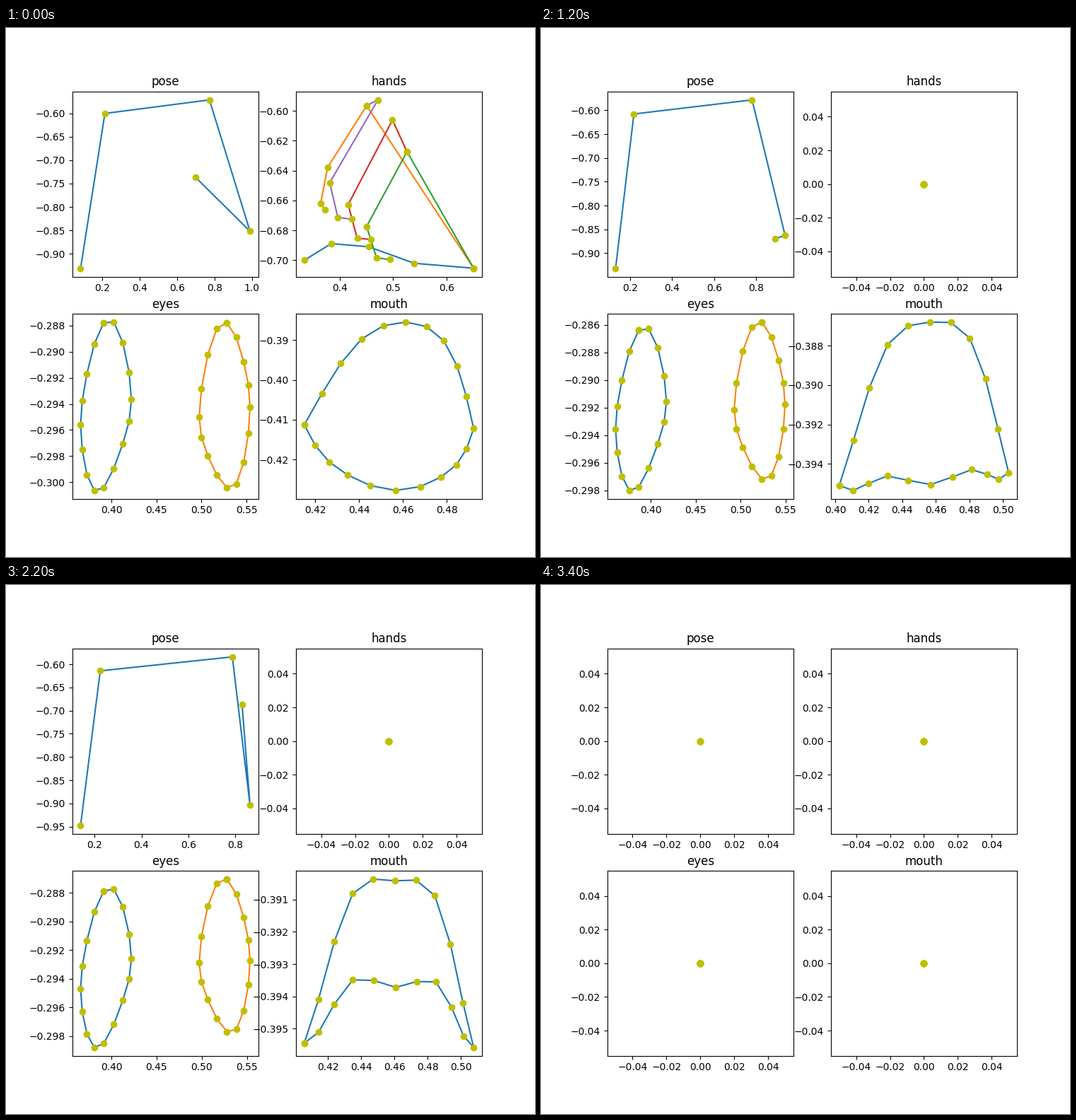
These frames come from a looping animation (748x748 px, 3800 ms). A matplotlib script:

```python
import numpy as np
import matplotlib.pyplot as plt
from matplotlib.animation import FuncAnimation

FRAMES, STEP = 19, 200
HAND_LOST, ALL_LOST = 5, 17
KEYS = [0, 2, 4, 8, 11, 13]

# Left elbow, right elbow, right wrist (x, y each)
ARMS = [
    (.083, -.931, .989, -.852, .699, -.737),
    (.093, -.923, 1.025, -.846, .739, -.754),
    (.138, -.930, 1.011, -.839, .852, -.788),
    (.126, -.933, .864, -.885, .931, -.952),
    (.140, -.947, .864, -.904, .830, -.687),
    (.162, -.931, .954, -.893, .866, -.708),
]
# Extent of both eyes: x0, x1, y0, y1
EYES = [
    (.3658, .5539, -.30064, -.28772),
    (.3637, .5548, -.30018, -.28754),
    (.3653, .5519, -.29588, -.28325),
    (.3564, .5468, -.30011, -.28836),
    (.3659, .5535, -.29878, -.28705),
    (.3584, .5492, -.30232, -.29117),
]
# Lips: corner x0, x1, corner y0, y1, rise of upper and lower lip
LIPS = [
    (.4149, .4922, -.4113, -.4122, .0267, -.0157),
    (.4126, .4957, -.4029, -.4036, .0220, -.0153),
    (.4062, .5053, -.3948, -.3931, .0120, -.0041),
    (.3986, .5014, -.3954, -.3958, .0045, .0041),
    (.4058, .5077, -.39545, -.39558, .0054, .0021),
    (.4025, .5005, -.39801, -.39907, .0052, .0032),
]
# Hand sketched on a 240 grid, y down: wrist and thumb tip,
# then knuckle, middle joint and tip of index, middle and little finger
HAND = [
    (239, 234, 0, 223, 88, 8, 33, 94, 29, 153,
     104, 0, 36, 115, 67, 166, 145, 72, 88, 176, 121, 222),
    (239, 238, 42, 201, 121, 80, 71, 45, 0, 0,
     152, 78, 71, 140, 106, 204, 210, 138, 143, 192, 165, 225),
    (215, 219, 0, 182, 112, 0, 56, 42, 44, 137,
     161, 15, 85, 83, 39, 175, 239, 120, 180, 184, 156, 238),
]
HAND_BOX = [
    (.3334, .6506, -.7054, -.5927),
    (.3366, .6477, -.6870, -.4652),
    (.6266, .8963, -.6507, -.5072),
]


def at(rows, i):
    """Interpolate a row of key values at frame i."""
    return np.array([np.interp(i, KEYS[:len(rows)], col) for col in zip(*rows)])


def fit(points, box):
    """Scale points to fill a data box."""
    u = (points - points.min(axis=0)) / np.ptp(points, axis=0)
    low, high = box[::2], box[1::2]
    return low + (high - low) * u


def drift(i):
    """Sideways slip of the head shortly before tracking stops."""
    return np.array([-.0006 * max(0, i - 13), 0])


def pose(i):
    elbow_l, elbow_r, wrist = at(ARMS, i).reshape(3, 2)
    shoulder_l = (.213 + .001 * i, -.600 - .0013 * i)
    shoulder_r = (.772 + .0015 * i, -.571 - .0012 * i)
    return np.array([elbow_l, shoulder_l, shoulder_r, elbow_r, wrist])


def hand(i):
    p = at(HAND, i).reshape(-1, 2)
    wrist, thumb = p[:2]
    index, middle, little = p[2:].reshape(3, 3, 2)
    ring = (middle + little) / 2
    ring[0, 1] -= 8

    along = np.array([[0, .35, .62, .84, 1]]).T
    bow = np.array([0, -3, -23, -25, 0])
    points = wrist + (thumb - wrist) * along
    points[:, 1] += bow
    for knuckle, joint, tip in (index, middle, ring, little):
        last = joint + .65 * (tip - joint) + .13 * (joint - knuckle)
        points = np.vstack((points, knuckle, joint, last, tip))
    return fit(points * [1, -1], at(HAND_BOX, i))


def eye(side, i):
    """Rim of one eye, clockwise from the top; side is 1 left, -1 right."""
    t = np.arange(16) * np.pi / 8
    slant = .1 + .004 * i
    x = np.sin(t) - .09 * side * np.cos(t) ** 2
    y = (.895 * np.cos(t) + .065 * np.cos(3 * t) + .04 * np.cos(2 * t)
         + side * (slant * np.sin(t) + .055 * np.sin(3 * t)) + .1 * np.sin(t))
    rise = .075 * min(i / 9, 1)
    return np.column_stack((.15 * x - .35 * side, y - rise * side))


def eyes(i):
    return fit(np.vstack((eye(1, i), eye(-1, i))), at(EYES, i)) + drift(i)


def lip(u, skew, bunch, lips, height):
    x0, x1, y0, y1 = lips[:4]
    s = u + skew * np.sin(np.pi * u) - bunch * np.sin(2 * np.pi * u)
    y = (y0 + (y1 - y0) * s + height * np.sin(np.pi * u)
         - .0003 * np.sin(5 * np.pi * u))
    return np.column_stack((x0 + (x1 - x0) * s, y))


def mouth(i):
    lips = at(LIPS, i)
    upper, lower = lips[4:]
    bunch = .045 + .8 * (upper - lower)
    u = np.linspace(0, 1, 11)
    top = lip(u, .035 + .065 * np.exp(-i), .045, lips, upper)
    bottom = lip(u[-2:0:-1], .04, bunch, lips, lower)
    return np.vstack((top, bottom)) + drift(i)


# Each panel: landmarks, then the order in which they are joined
PANELS = {
    "pose": (pose, [range(5)]),
    "hands": (hand, [range(5), [0, *range(5, 9)], [0, *range(17, 21)],
                     range(17, 12, -1), [5, *range(9, 13)]]),
    "eyes": (eyes, [[*range(16), 0], [*range(16, 32), 16]]),
    "mouth": (mouth, [[*range(20), 0]]),
}
# The ring finger hangs on the little finger's knuckle
PANELS["hands"][1][3] = [17, *range(13, 17)]

fig, grid = plt.subplots(2, 2, figsize=(7.5, 7.5), dpi=748 / 7.5)


def draw(i):
    for ax, (name, (landmarks, paths)) in zip(grid.flat, PANELS.items()):
        ax.clear()
        ax.set_title(name)
        points = landmarks(i)
        if i >= ALL_LOST or (name == "hands" and i >= HAND_LOST):
            points = np.zeros_like(points)
        for n, path in enumerate(paths):
            x, y = points[list(path)].T
            ax.plot(x, y, color=f"C{n}")
            ax.plot(x, y, "yo")


anim = FuncAnimation(fig, draw, frames=FRAMES, interval=STEP,
                     init_func=lambda: draw(0), repeat=True, repeat_delay=0)
plt.show()
```
